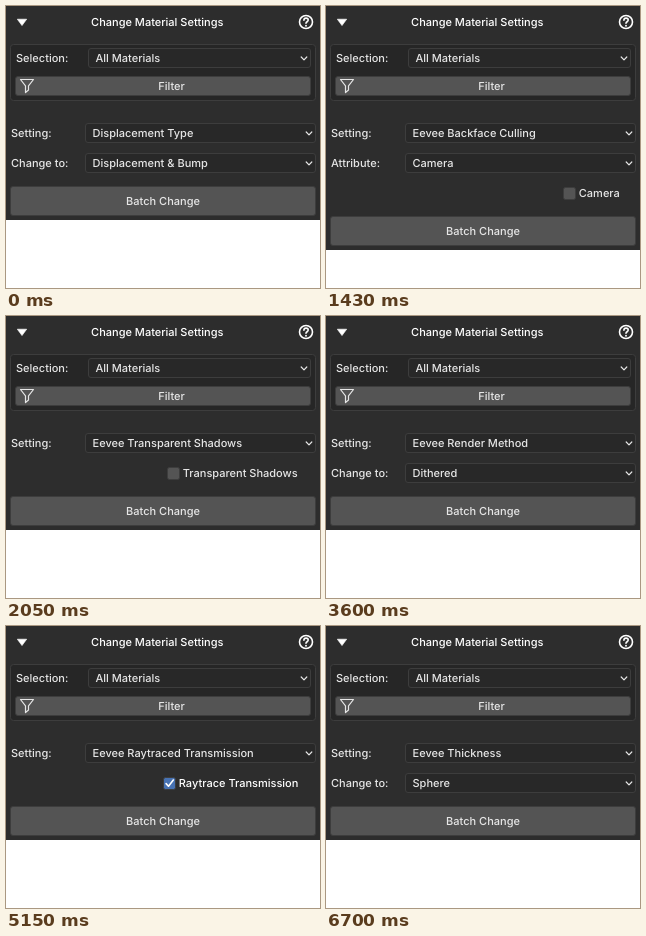
Recreate the animation shown at these times as an HTML page. Size 314 by 282 pixels, loop 8000 ms.

```html
<!DOCTYPE html>
<html lang="en">
<head>
<meta charset="utf-8">
<title>Change Material Settings</title>
<style>
  html, body { margin: 0; width: 100%; height: 100%; overflow: hidden; background: #fff; }
  svg { display: block; width: 314px; height: 282px; }
  text {
    font: 450 11px Inter, "Open Sans", sans-serif;
    font-variation-settings: "opsz" 14;
    text-rendering: geometricPrecision;
    fill: #e6e6e6;
    white-space: pre;
  }
  .bright { fill: #fff; }
  .mid { text-anchor: middle; }
  .button { fill: #545454; stroke: #3d3d3d; }
  .menu { fill: #282828; stroke: #3d3d3d; }
  .group { fill: #262626; stroke: #3d3d3d; }
  .check { fill: #545454; stroke: #3d3d3d; }
  .check.on { fill: #4772b3; }
  .line { fill: none; stroke: #e6e6e6; stroke-width: 1.2; stroke-linecap: round; stroke-linejoin: round; }
  .bold { stroke: #fff; stroke-width: 1.6; }
</style>
</head>
<body>
<svg id="stage" viewBox="0 0 314 282"></svg>
<script>
const LOOP = 8000;

// Start time, setting, then a second menu and/or a checkbox.
const steps = [
  { at: 0, setting: "Displacement Type", label: "Change to:", value: "Displacement &amp; Bump" },
  { at: 500, setting: "Eevee Backface Culling", label: "Attribute:", value: "Camera",
    check: { text: "Camera", x: 237.5 } },
  { at: 2050, setting: "Eevee Transparent Shadows", check: { text: "Transparent Shadows", x: 161.5 } },
  { at: 3600, setting: "Eevee Render Method", label: "Change to:", value: "Dithered" },
  { at: 5150, setting: "Eevee Raytraced Transmission",
    check: { text: "Raytrace Transmission", x: 157.5, on: true } },
  { at: 6700, setting: "Eevee Thickness", label: "Change to:", value: "Sphere" }
];

const text = (x, y, str, cls = "") => `<text x="${x}" y="${y}" class="${cls}">${str}</text>`;

const rect = (x, y, w, h, cls, r = 2.5) =>
  `<rect x="${x}" y="${y}" width="${w}" height="${h}" rx="${r}" class="${cls}"/>`;

const line = (d, cls = "") => `<path d="${d}" class="line ${cls}"/>`;

// A labelled drop-down; y is the vertical centre of the row.
const menuRow = (labelX, x, right, y, label, value) =>
  text(labelX, y + 4, label) +
  rect(x + .5, y - 9.5, right - x - 1, 19, "menu") +
  text(x + 7.5, y + 4, value) +
  line(`M${right - 9.8} ${y - 1}l2.8 2.8l2.8 -2.8`);

const checkRow = (y, { text: label, x, on }) =>
  rect(x, y - 5.5, 12, 12, on ? "check on" : "check", 2) +
  (on ? line(`M${x + 2.6} ${y + .6}l2.4 2.6l4.8 -6.2`, "bold") : "") +
  text(x + 15.3, y + 4, label, on ? "bright" : "");

const header =
  '<path d="M11.3 13.2h9.4l-4.7 6.4z" fill="#fff" stroke="#fff" stroke-width=".6" stroke-linejoin="round"/>' +
  text(151.3, 20, "Change Material Settings", "bright mid") +
  '<circle cx="300" cy="16" r="6.5" class="line bold"/>' +
  line("M297.9 14.3c0 -3 4.3 -2.8 4.3 -.2c0 1.7 -2.2 1.6 -2.2 3.2", "bold") +
  '<circle cx="300" cy="19.7" r=".95" class="bright"/>' +
  rect(4.5, 38.5, 305, 56, "group", 3) +
  menuRow(10, 82, 305, 52, "Selection:", "All Materials") +
  rect(9.5, 70.5, 295, 19, "button") +
  line("M14.5 73.5h13l-5 6.4v4.1l-3 2.5v-6.6z") +
  text(165.5, 84, "Filter", "mid");

function view(step) {
  let y = 127;
  let body = menuRow(5, 79, 310, y, "Setting:", step.setting);
  if (step.value) body += menuRow(5, 79, 310, y += 30, step.label, step.value);
  if (step.check) body += checkRow(y += 30, step.check);
  return `<rect width="314" height="${y + 57}" fill="#2d2d2d"/>` + header + body +
    rect(4.5, y + 23.5, 305, 29, "button") +
    text(157, y + 42, "Batch Change", "mid");
}

const stage = document.getElementById("stage");
const start = performance.now();
let shown;

function draw(now) {
  const t = Math.max(0, now - start) % LOOP;
  const step = steps.filter(s => s.at <= t).pop();
  if (step !== shown) {
    stage.innerHTML = view(step);
    shown = step;
  }
  requestAnimationFrame(draw);
}
draw(start);
</script>
</body>
</html>
```
